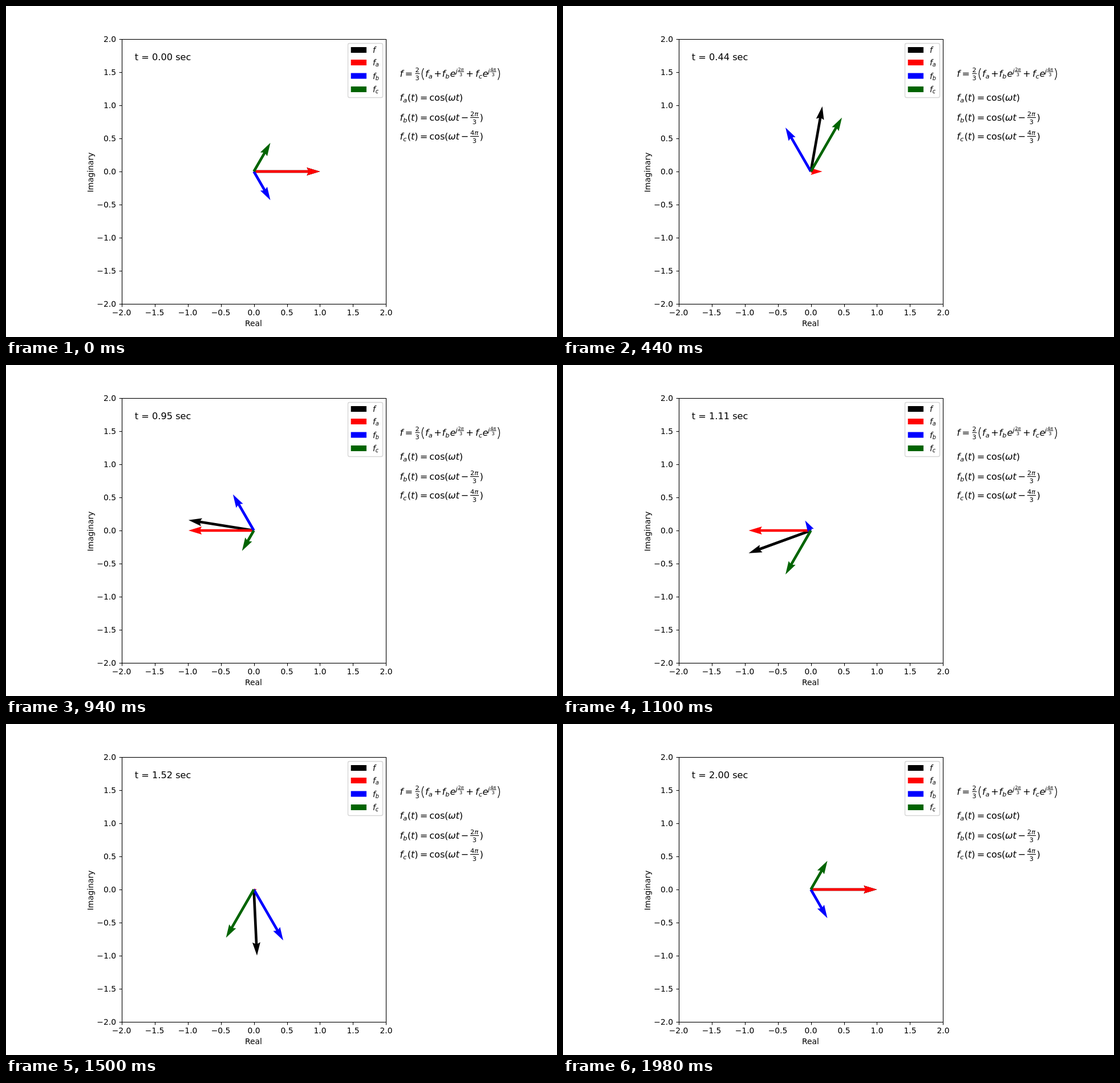
Animation of 966x580 px, one loop 2000 ms. Source, as an HTML page:

```html
<!DOCTYPE html>
<html>
<head>
<meta charset="utf-8">
<style>
html, body { margin: 0; width: 100%; height: 100%; overflow: hidden; background: #fff; }
svg { display: block; font-family: "DejaVu Sans", sans-serif; font-size: 13.89px; }
</style>
</head>
<body>
<svg id="stage" width="966" height="580"></svg>
<script>
const stage = document.getElementById('stage');
const UNIT = 116, CX = 434.5, CY = 290, SHAFT = 4.64;
const COLORS = ['#000', '#f00', '#00f', '#006400'];
const BIG = 16.2, SMALL = 11.34, TINY = 7.94;

const text = (x, y, s, extra = '') => `<text x="${x}" y="${y}" ${extra}>${s}</text>`;
const line = (x1, y1, x2, y2, w = 1.11) =>
  `<path d="M${x1} ${y1}L${x2} ${y2}" stroke="#000" stroke-width="${w}"/>`;
// Single letters are variables and set in italics.
const sym = (x, y, s, size = BIG) =>
  text(x, y, s, `font-size="${size}"` + (/^[a-zωπ]$/.test(s) ? ' font-style="italic"' : ''));
const row = (y, items) => items.map(([x, s, size, dy = 0]) => sym(x, y + dy, s, size)).join('');

function axes() {
  let out = '<rect x="203.5" y="58.5" width="463" height="464" fill="none" stroke="#000" stroke-width="1.11"/>';
  for (let i = 0; i <= 8; i++) {
    const v = i / 2 - 2, x = 202.6 + 57.98 * i, y = 522 - 58 * i;
    const label = (v < 0 ? '\u2212' : '') + Math.abs(v).toFixed(1);
    const tick = Math.round(x) + .5;
    out += line(tick, 522.5, tick, 527.4) + line(198.6, y + .5, 203.5, y + .5);
    out += text(x, 542, label, 'text-anchor="middle"');
    out += text(193, y + 5, label, 'text-anchor="end"');
  }
  out += text(434, 561, 'Real', 'text-anchor="middle"');
  return out + text(0, 0, 'Imaginary', 'text-anchor="middle" transform="translate(153 291.5) rotate(-90)"');
}

function legend() {
  let out = '<rect x="599.5" y="65.5" width="61" height="95" rx="2.8" fill="#fff" stroke="#ccc" stroke-opacity=".8" stroke-width="1.39"/>';
  [77, 99, 122.5, 146].forEach((y, i) => {
    out += `<rect x="604.7" y="${y - 5}" width="27.3" height="10" fill="${COLORS[i]}"/>`;
    out += sym(643, Math.round(y + 5), 'f', 13.89);
    if (i) out += sym(647.8, Math.round(y + 7), ' abc'[i], 9.72);
  });
  return out;
}

function formulas() {
  const phase = (x, y, digit) =>
    row(y, [[x, 'j', SMALL], [x + 4, digit, TINY, -4], [x + 9, 'π', TINY, -4], [x + 6.6, '3', TINY, 5.5]]) +
    line(x + 3.5, y - 2.5, x + 14.5, y - 2.5, .9);
  const wave = (y, name) => row(y, [
    [690.5, 'f'], [696.2, name, SMALL, 2.7], [703.8, '('], [710, 't'], [716.2, ')'],
    [725.8, '='], [742.2, 'cos'], [768.9, '('], [774.9, 'ω'], [788.4, 't']]);
  const shifted = (y, name, digit) => wave(y, name) +
    row(y, [[797.4, '\u2212'], [814, digit, SMALL, -7.8], [821.2, 'π', SMALL, -7.8], [817.7, '3', SMALL, 6.2], [830.5, ')']]) +
    line(814, y - 5.5, 829, y - 5.5);
  const paren = (x, bow) =>
    `<path d="M${x} 109Q${x + bow} 119 ${x} 129.5" fill="none" stroke="#000" stroke-width="1.2"/>`;
  return row(124, [
    [690.5, 'f'], [699.4, '='], [717.5, '2', SMALL, -7.8], [717.5, '3', SMALL, 6.2],
    [735, 'f'], [740.7, 'a', SMALL, 2.7], [750.2, '+'],
    [764.5, 'f'], [770.2, 'b', SMALL, 2.7], [778.6, 'e'],
    [806.3, '+'], [823, 'f'], [828.7, 'c', SMALL, 2.7], [835.4, 'e']]) +
    line(717.5, 118.5, 725.2, 118.5) + paren(732.2, -6) + paren(862.5, 6) +
    phase(788.5, 117.5, '2') + phase(845, 117.5, '4') +
    wave(166, 'a') + sym(794.8, 166, ')') +
    shifted(201, 'b', '2') + shifted(234, 'c', '4');
}

// Outline of an arrow in shaft widths; short arrows shrink, the shortest become hexagons.
function arrowPoints(x, y) {
  const len = Math.hypot(x, y) * UNIT / SHAFT, dir = Math.atan2(-y, x);
  let pts;
  if (len < 1) {
    pts = Array.from({ length: 6 }, (_, i) => [Math.cos(i * Math.PI / 3) / 2, Math.sin(i * Math.PI / 3) / 2]);
  } else {
    const full = Math.max(len, 5), k = len / full;
    const side = [[0, .5], [full - 4.5, .5], [full - 5, 1.5], [full, 0]];
    const back = side.slice(0, 3).reverse().map(([u, v]) => [u, -v]);
    pts = side.concat(back).map(([u, v]) => [u * k, v * k]);
  }
  const c = Math.cos(dir) * SHAFT, s = Math.sin(dir) * SHAFT;
  return pts.map(([u, v]) => [CX + u * c - v * s, CY + u * s + v * c].map(n => n.toFixed(2))).join(' ');
}

stage.innerHTML = axes() + COLORS.map(c => `<polygon fill="${c}"/>`).join('') +
  legend() + formulas() + text(225.8, 95, '', `id="clock" font-size="${BIG}"`);
const arrows = stage.querySelectorAll('polygon');
const clock = document.getElementById('clock');

function draw(now) {
  const sec = Math.floor(now % 2000 / 20) * 2 / 99, angle = Math.PI * sec;
  clock.textContent = `t = ${sec.toFixed(2)} sec`;
  arrows.forEach((arrow, i) => {
    const axis = (i - 1) * 2 * Math.PI / 3;
    const x = i ? Math.cos(angle - axis) * Math.cos(axis) : Math.cos(angle);
    const y = i ? Math.cos(angle - axis) * Math.sin(axis) : Math.sin(angle);
    arrow.setAttribute('points', arrowPoints(x, y));
  });
}

const start = performance.now();
function tick() {
  draw(performance.now() - start);
  requestAnimationFrame(tick);
}
tick();
</script>
</body>
</html>
```
